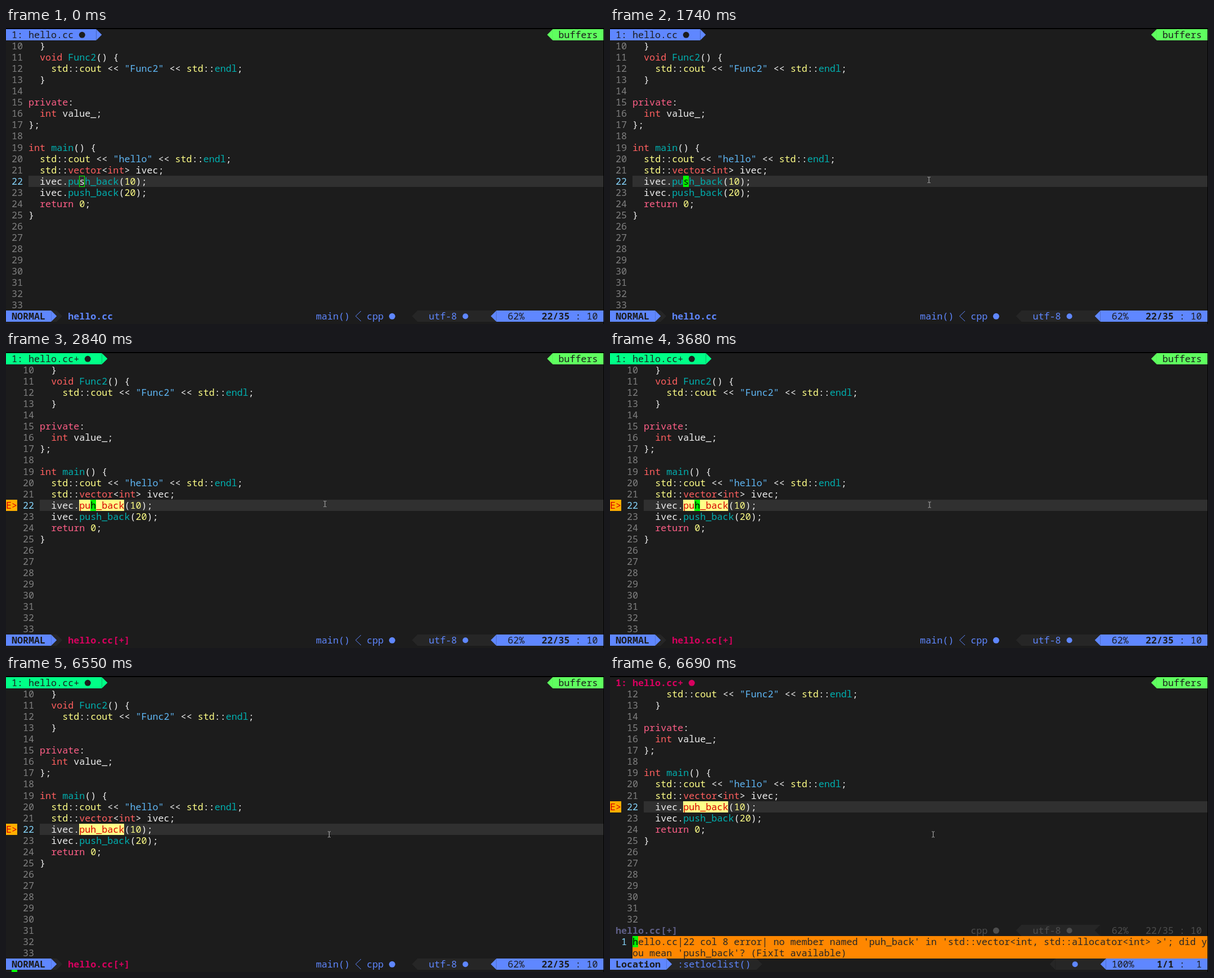
These frames come from a looping animation (1063x527 px, 8 s). An HTML page:

```html
<!DOCTYPE html>
<html lang="en">
<head>
<meta charset="utf-8">
<title>Editor</title>
<style>
html, body { margin: 0; width: 100%; height: 100%; overflow: hidden; background: #000; }
svg { display: block; width: 1063px; height: 527px; }
text { font: 16.7px "Noto Sans Mono", "DejaVu Sans Mono", monospace; white-space: pre; }
.b { font-weight: 700; }
</style>
</head>
<body>
<svg viewBox="0 0 1063 527" xmlns="http://www.w3.org/2000/svg">
  <g id="screen-layer"></g>
  <path id="mouse" d="M-2.5-5H-.8L0-4.2.8-5H2.5M-2.5 5H-.8L0 4.2.8 5H2.5M0-4.2V4.2" fill="none" stroke="#b4b4b4"/>
</svg>
<script>
const LOOP = 8000, CELL = 10.02, LINE = 20.04, RIGHT = 1062;
const C = {
  bg: '#1c1c1c', seg: '#262626', row: '#303030', text: '#eeeeee', num: '#808080', cur: '#87d7ff',
  blue: '#5f87ff', green: '#5fff5f', mint: '#00ff87', cursor: '#00ff00', crimson: '#d7005f',
  pink: '#ff5f87', red: '#ff5f5f', yellow: '#ffff87', teal: '#00afaf', string: '#5fb7f5',
  error: '#d70000', sign: '#ffaf00', orange: '#ff8700', dim: '#4e4e4e', dimName: '#5f5f87', ink: '#1c1c1c'
};

const FIRST = 10, CURRENT = 22;
const CODE = `  }
  void Func2() {
    std::cout << "Func2" << std::endl;
  }

private:
  int value_;
};

int main() {
  std::cout << "hello" << std::endl;
  std::vector<int> ivec;
  ivec.push_back(10);
  ivec.push_back(20);
  return 0;
}`.split('\n');

const RULES = [
  [/^"/, C.string],
  [/^(private|return)$/, C.pink],
  [/^(void|int|vector)$/, C.red],
  [/^(std|cout|\d+)$/, C.yellow],
  [/^(Func2|main|endl|push_back|puh_back)$/, C.teal]
];

const px = col => +(col * CELL).toFixed(2);
const rowTop = row => Math.round(2.4 + row * LINE);
const escapeText = s => s.replace(/&/g, '&amp;').replace(/</g, '&lt;');

const box = (x1, x2, row, fill, rows = 1) =>
  `<rect x="${x1}" y="${rowTop(row)}" width="${x2 - x1}" height="${rowTop(row + rows) - rowTop(row)}" fill="${fill}"/>`;
const cells = (from, to, row, fill) => box(Math.round(px(from)), Math.round(px(to)), row, fill);
const text = (col, row, s, fill, bold) =>
  `<text x="${px(col)}" y="${(18.1 + row * LINE).toFixed(2)}" fill="${fill}"${bold ? ' class="b"' : ''}>${escapeText(s)}</text>`;
const dot = (col, row, fill, r = 5.5) =>
  `<circle cx="${px(col + .5)}" cy="${rowTop(row) + 10.3}" r="${r}" fill="${fill}"/>`;
const block = (col, row, ch) => cells(col, col + 1, row, C.cursor) + text(col, row, ch, '#000');

// Triangular separator filling one cell; dir 1 points right, -1 left.
function arrow(col, row, fill, dir) {
  const base = px(dir > 0 ? col : col + 1), tip = px(dir > 0 ? col + 1 : col);
  return `<path d="M${base} ${rowTop(row)}L${tip} ${rowTop(row) + 10}L${base} ${rowTop(row + 1)}Z" fill="${fill}"/>`;
}

function codeLine(col, row, line) {
  const tokens = line.match(/"[^"]*"|\w+|\s+|[^\w\s"]/g) || [];
  let out = '';
  for (const token of tokens) {
    const rule = RULES.find(([pattern]) => pattern.test(token));
    if (token.trim()) out += text(col, row, token, rule ? rule[1] : C.text);
    col += token.length;
  }
  return out;
}

function tabBar(s) {
  const end = s.modified ? 17 : 16;
  const fill = s.modified ? C.mint : C.blue;
  const ink = s.list ? C.crimson : C.ink;
  const bar = s.list ? '' : cells(0, end, 0, fill) + arrow(end, 0, fill, 1);
  return bar + text(1, 0, s.modified ? '1: hello.cc+' : '1: hello.cc', ink, s.list) +
    dot(end - 3, 0, ink) +
    arrow(96, 0, C.green, -1) + box(972, RIGHT, 0, C.green) + text(98, 0, 'buffers', C.ink);
}

function position(row, percent, place, col, column, ink, bold) {
  return text(89, row, percent, ink) + text(col, row, place, ink, bold) +
    text(101, row, ':', ink) + text(105 - column.length, row, column, ink);
}

function fileStatus(s) {
  const row = s.list ? 22 : 25, ink = s.list ? C.dim : C.blue;
  const name = s.modified ? 'hello.cc[+]' : 'hello.cc';
  const out = arrow(72, row, C.seg, -1) + cells(73, 87, row, C.seg) +
    text(64, row, 'cpp', ink) + dot(68, row, ink) +
    text(75, row, 'utf-8', ink) + dot(81, row, ink, 5);
  if (s.list) {
    return out + arrow(86, row, C.bg, -1) + text(1, row, name, C.dimName, true) +
      position(row, '62%', '22/35', 95, '10', ink);
  }
  const y = rowTop(row);
  return out + cells(0, 8, row, C.blue) + cells(8, 9, row, C.seg) + arrow(8, row, C.blue, 1) +
    arrow(9, row, C.seg, 1) + text(1, row, 'NORMAL', C.ink, true) +
    text(11, row, name, s.modified ? C.crimson : C.blue, true) +
    text(55, row, 'main()', C.blue) +
    `<path d="M631 ${y + 1}L621.5 ${y + 10}L631 ${y + 19}" fill="none" stroke="${C.blue}"/>` +
    arrow(86, row, C.blue, -1) + box(872, RIGHT, row, C.blue) +
    position(row, '62%', '22/35', 95, '10', C.ink, true);
}

function locationList() {
  const message = "hello.cc|22 col 8 error| no member named 'puh_back' in " +
    "'std::vector<int, std::allocator<int> >'; did you mean 'push_back'? (FixIt available)";
  return box(40, RIGHT, 23, C.orange, 2) + text(2, 23, '1', C.cur) +
    text(4, 23, message.slice(0, 102), C.seg) + text(4, 24, message.slice(102), C.seg) +
    block(4, 23, 'h') +
    cells(0, 10, 25, C.blue) + cells(10, 26, 25, C.seg) + arrow(10, 25, C.blue, 1) +
    arrow(26, 25, C.seg, 1) + text(1, 25, 'Location', C.ink, true) +
    text(12, 25, ':setloclist()', C.blue) +
    arrow(78, 25, C.seg, -1) + cells(79, 88, 25, C.seg) + dot(82, 25, C.blue, 5) +
    arrow(87, 25, C.blue, -1) + box(882, RIGHT, 25, C.blue) +
    position(25, '100%', '1/1', 97, '1', C.ink, true);
}

function draw(s) {
  const first = s.list ? 12 : FIRST, last = s.list ? 32 : 33;
  const left = s.error ? 6 : 4, row = CURRENT - first + 1;
  let out = `<rect y="2" width="${RIGHT}" height="525" fill="${C.bg}"/>` + tabBar(s) +
    box(Math.round(px(left)), RIGHT, row, C.row);

  for (let n = first; n <= last; n++) {
    const line = CODE[n - FIRST] || '';
    const shown = n === CURRENT && s.modified ? line.replace('push', 'puh') : line;
    out += text(left - 3, n - first + 1, String(n), n === CURRENT ? C.cur : C.num) +
      codeLine(left, n - first + 1, shown);
  }
  if (s.error) {
    out += cells(0, 2, row, C.sign) + text(0, row, 'E>', C.error) +
      cells(13, 21, row, C.yellow) + text(13, row, 'puh_back', C.error);
  }

  const col = left + 9;
  if (!s.focused) {
    out += cells(col, col + 1, row, C.row) + text(col, row, 's', C.text) +
      `<rect x="${Math.round(px(col)) + .5}" y="${rowTop(row) + .5}" width="9" height="19" fill="none" stroke="${C.cursor}"/>`;
  } else if (s.prompt < 0 && !s.list) {
    out += block(col, row, s.modified ? 'h' : 's');
  }
  out += fileStatus(s);
  if (s.list) out += locationList();
  else if (s.prompt >= 0) {
    if (s.prompt > 1) out += text(11, 26, 'is of a f l', C.text);
    out += cells(s.prompt, s.prompt + 1, 26, C.cursor);
  }
  return out;
}

const stateAt = t => ({
  focused: t >= 1740,
  modified: t >= 2750,
  error: t >= 2840,
  prompt: t < 6550 ? -1 : t < 6630 ? 1 : 21,
  list: t >= 6690
});

// Mouse moves: start, interval, steps, from, to.
const MOVES = [
  [120, 75, 4, [996, 506], [842.5, 346.5]],
  [1360, 76, 4, [800, 334], [567, 270.5]],
  [3680, 80, 3, [568, 272], [573.5, 281.5]],
  [4300, 1, 1, [574.5, 282], [574.5, 282]]
];

function mouseAt(t) {
  const move = MOVES.filter(m => t >= m[0]).pop();
  if (!move) return null;
  const [start, interval, steps, from, to] = move;
  const p = Math.min(1, Math.floor((t - start) / interval) / steps);
  const eased = 1 - (1 - p) ** 2;
  return from.map((v, i) => v + (to[i] - v) * eased);
}

const layer = document.getElementById('screen-layer');
const mouse = document.getElementById('mouse');
let shownKey = '';

function render(t) {
  const state = stateAt(t), key = JSON.stringify(state);
  if (key !== shownKey) {
    layer.innerHTML = draw(state);
    shownKey = key;
  }
  const at = mouseAt(t);
  mouse.setAttribute('visibility', at ? 'visible' : 'hidden');
  if (at) mouse.setAttribute('transform', `translate(${at})`);
}

const began = performance.now();
function tick() {
  render((performance.now() - began) % LOOP);
  requestAnimationFrame(tick);
}
tick();
</script>
</body>
</html>
```
